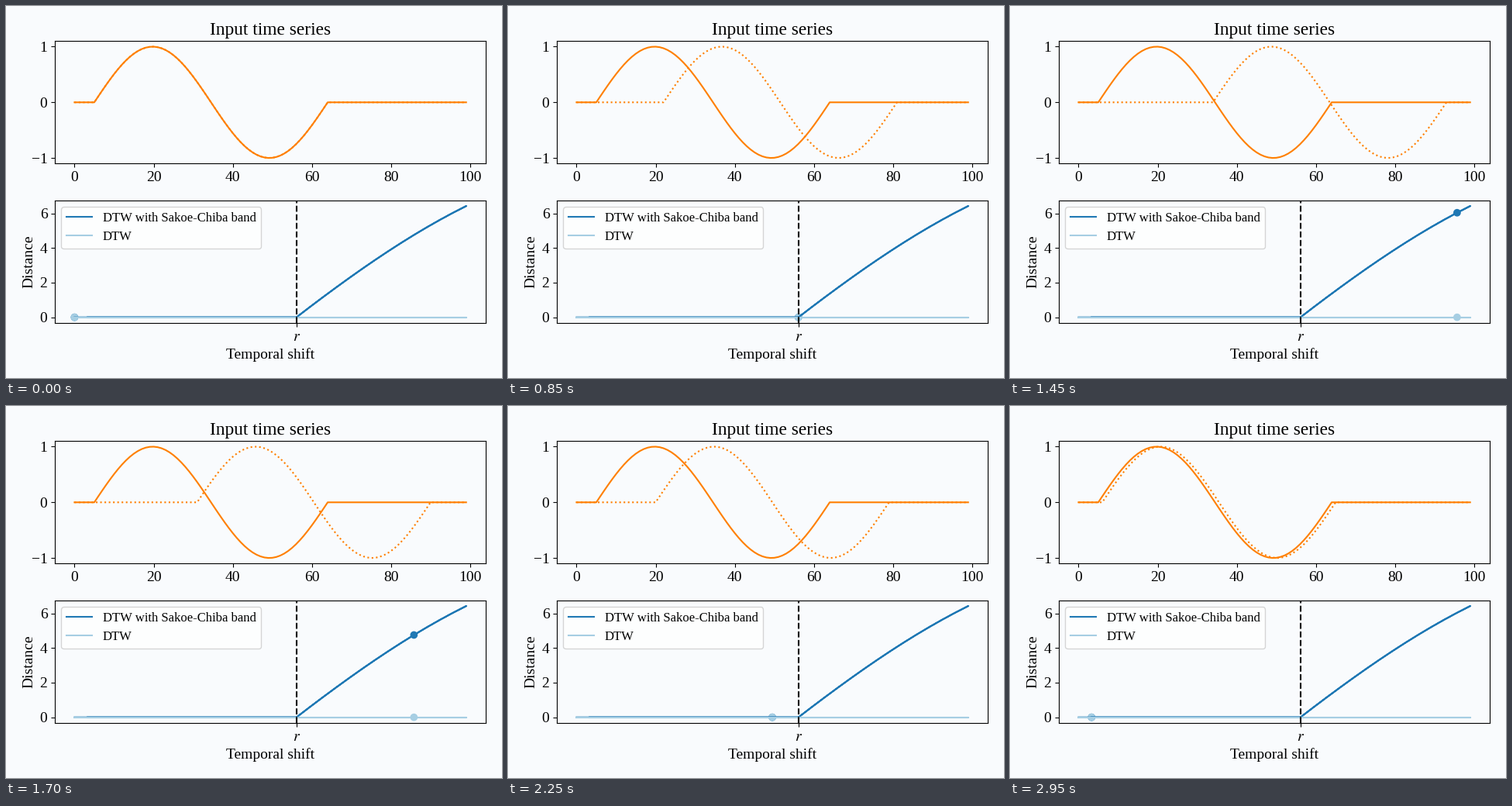
A matplotlib script that plays this animation: 640x480 px, repeating every 3000 ms.

```python
import numpy as np
import matplotlib.pyplot as plt
from matplotlib.animation import FuncAnimation

BG = "#f9fbfd"
ORANGE, BLUE, LIGHT = "#ff7f00", "#1f78b4", "#a6cee3"
N, START, WAVE = 100, 5, 60
MAX_SHIFT, BAND = 30, 17
FRAMES = 2 * MAX_SHIFT

plt.rcParams.update({
    "font.family": "Liberation Serif",
    "font.size": 14,
    "legend.fontsize": 12,
    "mathtext.fontset": "stix",
})


def series(shift):
    """One sine period padded with zeros, delayed by shift samples."""
    y = np.zeros(N)
    first = START + shift
    y[first:first + WAVE] = np.sin(np.linspace(0, 2 * np.pi, WAVE))
    return y


def band_distance(shift):
    """The band absorbs up to BAND samples; the rest is Euclidean."""
    rest = max(shift - BAND, 0)
    return np.linalg.norm(series(rest) - series(0))


def shift_at(i):
    return min(i, FRAMES - i)


shifts = np.array([shift_at(i) for i in range(FRAMES)])
banded = np.array([band_distance(s) for s in shifts])
free = np.zeros(FRAMES)

fig, (top, low) = plt.subplots(2, 1, figsize=(6.4, 4.8), dpi=100)
fig.patch.set_facecolor(BG)
for ax in (top, low):
    ax.set_facecolor(BG)

top.set_title("Input time series")
top.plot(series(0), color=ORANGE)
moving, = top.plot(series(0), color=ORANGE, linestyle=":")

low.plot(shifts, banded, color=BLUE, label="DTW with Sakoe-Chiba band")
low.plot(shifts, free, color=LIGHT, label="DTW")
low.axvline(BAND, color="black", linestyle="--")
dots = low.scatter([0, 0], [0, 0], color=[BLUE, LIGHT])
low.set_xticks([BAND], ["$r$"])
low.set_yticks([0, 2, 4, 6])
low.set_xlabel("Temporal shift")
low.set_ylabel("Distance")
low.legend(loc="upper left")
fig.tight_layout()


def update(i):
    s = shift_at(i)
    moving.set_ydata(series(s))
    dots.set_offsets([(s, banded[i]), (s, 0)])
    return moving, dots


anim = FuncAnimation(fig, update, frames=FRAMES, interval=50,
                     repeat=True, repeat_delay=0)
plt.show()
```
